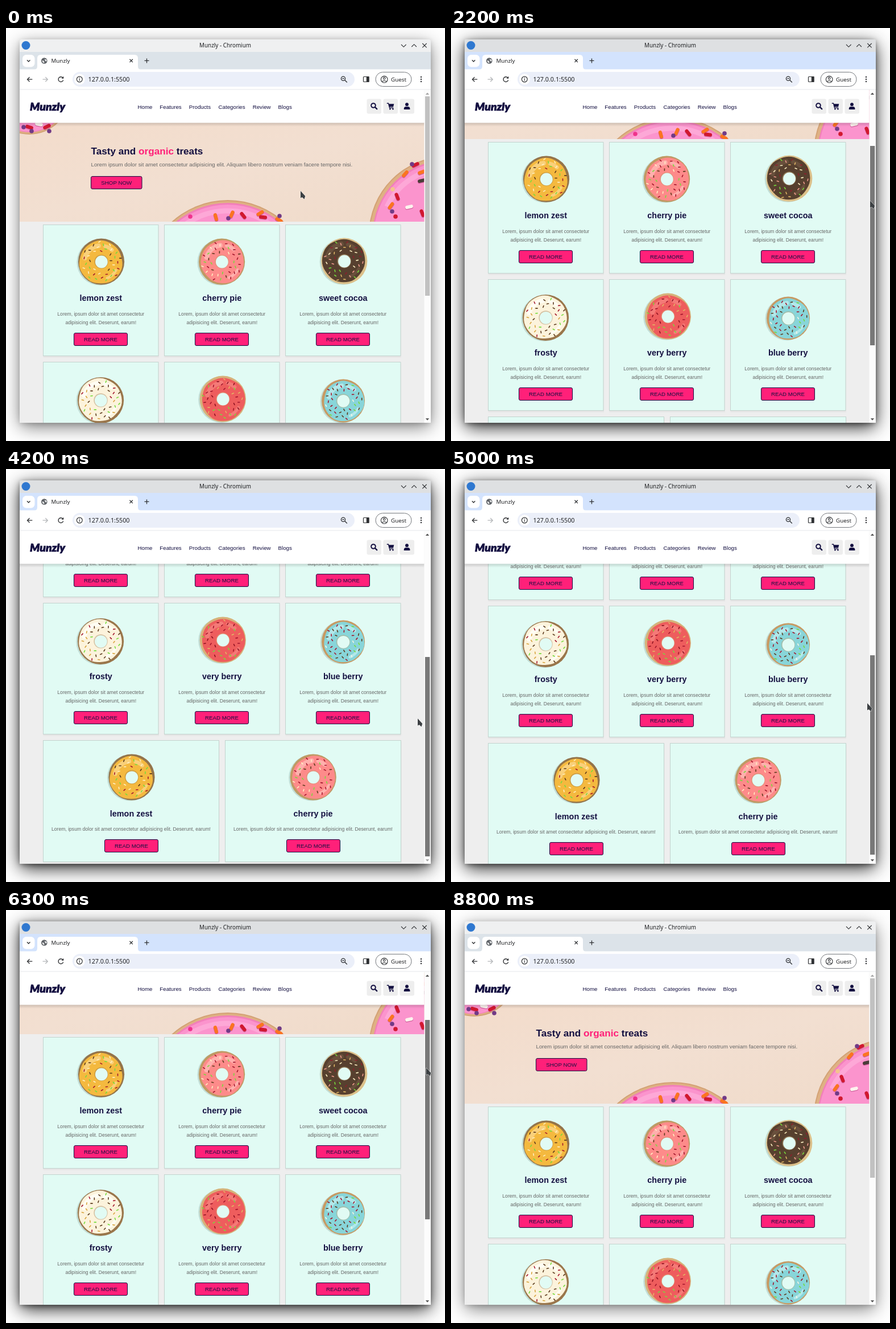
Recreate the animation shown at these times as an HTML page. Size 772 px wide and 725 px high, loop 8900 ms.

```html
<!DOCTYPE html>
<html lang="en">
<head>
<meta charset="utf-8">
<title>Munzly</title>
<style>
  html, body { margin: 0; width: 100%; height: 100%; overflow: hidden; background: #fff; }
  .shadow { position: absolute; left: 25px; top: 21px; width: 721px; height: 671px; border-radius: 4px; }
  #idle { box-shadow: 0 8px 32px rgba(0,0,0,.52), 0 2px 10px rgba(0,0,0,.2); }
  #focus { box-shadow: 0 8px 32px rgba(0,0,0,.88), 0 2px 10px rgba(0,0,0,.5); }
  svg { position: absolute; left: 0; top: 0; display: block; }
  text { font-family: "Liberation Sans", Arial, sans-serif; white-space: pre; }
  .ui { font-family: "Noto Sans", sans-serif; fill: #1f2023; }
  .logo { font: italic 900 19.5px Lato, sans-serif; fill: #130f40; stroke: #130f40; stroke-width: .7; }
</style>
</head>
<body>
<div class="shadow" id="idle"></div>
<div class="shadow" id="focus"></div>
<svg id="stage" width="772" height="725" viewBox="0 0 772 725"></svg>
<script>
const NAME = 'Munzly', NAVY = '#130f40', PINK = '#ff2079', MINT = '#e1fbf4', GREY = '#666';
const LOOP = 8900, STEP = 100, MAX_SCROLL = 351, TRACK = 1.671;

// Drawing helpers
const n = v => +v.toFixed(2);
const rect = (x, y, w, h, fill, r = 0, more = '') =>
  `<rect x="${x}" y="${y}" width="${w}" height="${h}" rx="${r}" fill="${fill}" ${more}/>`;
const circle = (x, y, r, fill, more = '') =>
  `<circle cx="${n(x)}" cy="${n(y)}" r="${n(r)}" fill="${fill}" ${more}/>`;
const path = (d, fill, more = '') => `<path d="${d}" fill="${fill}" ${more}/>`;
const line = (d, color, w = 1, more = '') =>
  path(d, 'none', `stroke="${color}" stroke-width="${w}" ${more}`);
const text = (x, y, size, str, fill, more = '') =>
  `<text x="${x}" y="${y}" font-size="${size}" fill="${fill}" ${more}>${str}</text>`;
const ui = (x, y, size, str, more = '') =>
  `<text class="ui" x="${x}" y="${y}" font-size="${size}" ${more}>${str}</text>`;
const MID = 'text-anchor="middle"', BOLD = 'font-weight="bold"', ROUND = 'stroke-linecap="round"';

function random(seed) {
  return () => (seed = (seed * 16807) % 2147483647) / 2147483647;
}

function arc(x, y, r, from, to) {
  const at = deg => {
    const a = deg * Math.PI / 180;
    return `${n(x + r * Math.cos(a))} ${n(y + r * Math.sin(a))}`;
  };
  return `M${at(from)}A${r} ${r} 0 0 1 ${at(to)}`;
}

function pill(x, y, angle, len, w, color) {
  const dx = Math.cos(angle) * len / 2, dy = Math.sin(angle) * len / 2;
  return line(`M${n(x - dx)} ${n(y - dy)}L${n(x + dx)} ${n(y + dy)}`, color, w, ROUND);
}

function button(x, y, w, label) {
  return rect(x, y, w, 22, PINK, 2.5, `stroke="${NAVY}"`) +
    text(x + w / 2, y + 14.6, 9.72, label, NAVY, MID);
}

// Doughnuts
const CRIMSON = '#a3152c', BROWN = '#5c3a1c', GREEN = '#76dc3c', CREAM = '#fff0c2', SAND = '#e2b765';
const FLAVOURS = {
  lemon:  { name: 'lemon zest',  dough: '#94744a', icing: '#f4b93f', shine: '#f9d07a', lean: 2.2,
            bits: [BROWN, CRIMSON, GREEN, CREAM, CRIMSON] },
  cherry: { name: 'cherry pie',  dough: '#bf9a64', icing: '#fd8b8a', shine: '#ffb0ad', lean: .1,
            bits: [BROWN, CRIMSON, GREEN, CREAM, CRIMSON] },
  cocoa:  { name: 'sweet cocoa', dough: '#dcc08a', icing: '#57402f', shine: '#69503c', lean: 3.9,
            bits: [SAND, '#8f1d2c', GREEN, CREAM, '#ef9a8c'] },
  frosty: { name: 'frosty',      dough: '#9a764b', icing: '#fcf3dc', shine: '#fffdf3', lean: 3.8,
            bits: [BROWN, CRIMSON, GREEN, '#d7a33c', BROWN] },
  berry:  { name: 'very berry',  dough: '#d6b27a', icing: '#ee5d5d', shine: '#f47a77', lean: .6,
            bits: [CRIMSON, SAND, GREEN, '#8c1020', SAND] },
  blue:   { name: 'blue berry',  dough: '#c79a63', icing: '#88d5d9', shine: '#b3e8ea', lean: .4,
            bits: [BROWN, CRIMSON, GREEN, '#f6f6e4', CRIMSON] }
};

function donut(x, y, r, f, seed) {
  const rnd = random(seed * 7919), count = 38;
  const cx = x + 1.3 * Math.cos(f.lean), cy = y + 1.3 * Math.sin(f.lean);
  const edge = Array.from({ length: 48 }, (_, i) => {
    const a = i * Math.PI / 24;
    const q = r * .93 + .5 * Math.sin(3 * a + seed) + .3 * Math.sin(7 * a);
    return `${n(cx + q * Math.cos(a))} ${n(cy + q * Math.sin(a))}`;
  });
  let s = circle(x - 2.5, y + 1, r, '#b9d3cb', 'opacity=".75"') + circle(x, y, r, f.dough) +
    path(`M${edge.join('L')}Z`, f.icing) +
    line(arc(cx, cy, r * .72, 195, 262), f.shine, r * .2, ROUND) +
    line(arc(cx, cy, r * .72, 285, 312), f.shine, r * .16, ROUND) +
    line(arc(cx, cy, r * .74, 28, 68), f.shine, r * .12, ROUND);
  for (let i = 0; i < count; i++) {
    const q = r * Math.sqrt(.17 + .6 * (i + .5) / count), a = i * 2.4 + seed;
    s += pill(x + q * Math.cos(a), y + q * Math.sin(a), rnd() * Math.PI, 3.2, 1.6,
      f.bits[Math.floor(rnd() * f.bits.length)]);
  }
  return s + circle(x, y, 12.2, f.dough, 'opacity=".4"') + circle(x + .3, y + .3, 10.9, MINT);
}

function card(x, y, w, key, dx, dy, wide) {
  const f = FLAVOURS[key], c = x + w / 2;
  const copy = ['Lorem, ipsum dolor sit amet consectetur', 'adipisicing elit. Deserunt, earum!'];
  const lines = wide ? [copy.join(' ')] : copy;
  return rect(x, y + 2, w + 1, wide ? 213 : 231, '#000', 0, 'opacity=".04"') +
    rect(x, y, w, wide ? 213 : 230, MINT, 0, 'stroke="#c3d3ce"') +
    donut(c + dx, y + dy, key === 'blue' ? 38 : 40.6, f, key.length + key.charCodeAt(0)) +
    text(c, y + 133.5, 14.4, f.name, NAVY, `${MID} ${BOLD}`) +
    lines.map((l, i) => text(c, y + (wide ? 158.3 : 159) + i * 15.5, 8.6, l, GREY, MID)).join('') +
    button(Math.floor(c - 47) + .5, wide ? y + 174 : y + 190, 94, 'READ MORE');
}

// Hero banner
const RED = '#d1182f', ORANGE = '#fb7420', PLUM = '#713a86', WHITE = '#fdf2ee';

function bigDonut(x, y, r, rim) {
  return circle(x, y, r, '#d3a275') + circle(x, y, r - 2, '#dfb184') + circle(x, y, r - rim, '#f27fba') +
    circle(x, y + 1, r - rim - 2, '#fb94cd') +
    line(arc(x, y, r - rim - 14, 205, 330), '#ffb6de', 9, 'opacity=".6"');
}

function hero() {
  const bits = [
    [369, 332, 1.3, ORANGE], [397, 327, 2, ORANGE], [417, 329, .9, RED], [447, 325, 2.6, ORANGE],
    [452, 332, .1, RED], [480, 337, .5, ORANGE], [720, 240, 2.7, RED], [702, 256, 2.3, ORANGE],
    [731, 253, 2.8, ORANGE], [731, 268, 2.9, '#4a3d38'], [688, 296, 1.2, RED], [677, 312, 2.2, ORANGE],
    [709, 314, 2.9, WHITE], [732, 325, 1.2, RED], [41, 174, .3, RED], [72, 173, 2.7, RED], [58, 169, .2, WHITE]
  ];
  const balls = [
    [324, 331, '#f0338c'], [391, 334, PLUM], [481, 330, PLUM], [714, 239, PLUM], [680, 283, '#f3c38e'],
    [679, 322, PLUM], [685, 331, RED], [31, 174, PLUM], [45, 181, PLUM], [76, 181, PLUM]
  ];
  return `<g clip-path="url(#banner)">` + rect(24, 166, 712, 174, 'url(#cream)') +
    bigDonut(41, 115, 72, 4) + bigDonut(390, 449, 147, 5) + bigDonut(776, 363, 138, 7) +
    bits.map(([x, y, a, c]) => pill(x, y + 1, a, 8, 6.5, '#d0609c') + pill(x, y, a, 8, 6, c)).join('') +
    balls.map(([x, y, c]) => circle(x, y, 3.8, c)).join('') + '</g>' +
    text(149.5, 221.8, 17.15, `Tasty and <tspan fill="${PINK}">organic</tspan> treats`, NAVY, BOLD) +
    text(149.5, 243, 9.726, 'Lorem ipsum dolor sit amet consectetur adipisicing elit. ' +
      'Aliquam libero nostrum veniam facere tempore nisi.', GREY) +
    button(149.5, 260.5, 89.5, 'SHOP NOW');
}

function page() {
  const xs = [65.5, 278.5, 491.5];
  const rows = [
    [['lemon', .8, 64.7], ['cherry', -.2, 64.7], ['cocoa', 2, 63.7]],
    [['frosty', -.2, 67], ['berry', 1.6, 64.7], ['blue', .3, 68]]
  ];
  return hero() +
    rows.map((row, r) => row.map(([k, dx, dy], i) =>
      card(xs[i], 345.5 + r * 241, 202.5, k, dx, dy)).join('')).join('') +
    card(65.5, 827.5, 309, 'lemon', 1, 64.5, true) + card(385.5, 827.5, 309, 'cherry', .2, 64.5, true);
}

// Fixed site header
function header() {
  const nav = [[231.5, 'Home'], [270.3, 'Features'], [321.8, 'Products'],
    [373.6, 'Categories'], [433.7, 'Review'], [478.5, 'Blogs']];
  return rect(24, 166, 711.5, 7, 'url(#fade)') + rect(24, 108, 711.5, 58.5, '#fff') +
    `<text class="logo" x="42" y="145">${NAME}</text>` +
    nav.map(([x, s]) => text(x, 141.6, 9.72, s, NAVY)).join('') +
    [634.5, 663.5, 692.5].map(x => rect(x, 124.5, 25.5, 26, '#eee', 3)).join('') +
    circle(646, 136, 3.8, 'none', `stroke="${NAVY}" stroke-width="2"`) +
    line('M649 139l3.2 3.2', NAVY, 2.4, ROUND) +
    line('M670.3 132.3h2.2l2 7.8h6.4', NAVY, 1.4, ROUND) +
    path('M673 133.2h9.3l-1.3 5.4h-6.8z', NAVY) +
    circle(675.4, 142.2, 1.3, NAVY) + circle(680.4, 142.2, 1.3, NAVY) +
    circle(705, 134.2, 2.9, NAVY) + path('M699.8 143v-1.4q0-3.6 3.6-3.6h3.4q3.6 0 3.6 3.6V143z', NAVY);
}

// Browser frame
function frame() {
  const ink = '#303235', bar = 'M24 42V23q0-3 3-3H744q3 0 3 3V42z';
  const cross = (x, y, r) => `M${x - r} ${y - r}l${2 * r} ${2 * r}M${x + r} ${y - r}l${-2 * r} ${2 * r}`;
  return path(bar, '#eff0f1') + rect(24, 42, 723, 31, '#dce3e9') +
    '<g id="tint">' + path(bar, '#dee0e2') + rect(24, 42, 723, 31, '#d3e3fd') + '</g>' +
    circle(35, 30.5, 7.5, '#2f78d0') +
    ui(385.5, 34.3, 9.9, `${NAME} - Chromium`, MID) +
    line(`M695 29l4.3 4.3 4.3-4.3M713.3 33l4.3-4.3 4.3 4.3${cross(736, 30.7, 3.7)}`, ink, 1.1) +
    path('M49 73q6 0 6-6V53q0-6 6-6H226q6 0 6 6V67q0 6 6 6z', '#fff') +
    rect(29, 47, 21.5, 21.5, '#fff', 6.5) + line('M37 56.2l2.7 2.7 2.7-2.7', ink, 1.4) +
    circle(67.3, 57.5, 5.3, '#5f6368') +
    path('M63.5 57q2.5-.5 3.5 1.5t0 3q-3-.5-3.5-4.5zM67 53.5q1 2 3 1.5t1.5 3.5q-3 0-3-2z', '#fff', 'opacity=".85"') +
    ui(79.5, 61, 9.75, NAME) +
    line(cross(220.2, 57.4, 2.7), ink, 1.3) + line('M243.5 57.4h8M247.5 53.4v8', ink, 1.3) +
    rect(24, 72.5, 723, 36, '#fff') + rect(24, 107.5, 723, .8, '#dfe1e5') +
    line('M46.3 90.2h-8.8m4-4l-4 4 4 4', ink, 1.3) + line('M64.5 90.2h8.8m-4-4l4 4-4 4', '#b4b6b9', 1.3) +
    line('M99.8 87.2A4.4 4.4 0 1 0 100.7 91.4', ink, 1.4) + path('M101.3 84.8v4h-4z', ink) +
    rect(117, 77, 496, 26, '#ebeff9', 13) + circle(129.3, 90, 9.5, '#fff') +
    circle(129.3, 90, 4.9, 'none', `stroke="${ink}" stroke-width="1.2"`) +
    line('M129.3 89.3v3.2M129.3 87v1.2', ink, 1.2) +
    ui(144.5, 93.9, 10.75, '127.0.0.1:5500') +
    circle(593, 88.7, 3.6, 'none', `stroke="${ink}" stroke-width="1.3"`) +
    line('M595.8 91.5l4 4M591.2 88.7h3.6', ink, 1.3) +
    rect(628.5, 85.5, 9.5, 9, 'none', 1, `stroke="${ink}" stroke-width="1.2"`) + rect(633.8, 85, 4.7, 10, ink) +
    rect(650, 77.5, 63, 25, '#fff', 12.5, 'stroke="#74777c"') +
    circle(665.2, 90.2, 5.8, 'none', `stroke="${ink}" stroke-width="1.1"`) +
    circle(665.2, 88.4, 1.8, 'none', `stroke="${ink}" stroke-width="1.1"`) +
    line('M661.2 94.2q4-3.4 8 0', ink, 1.1) + ui(677, 93.8, 9.8, 'Guest') +
    [86, 90, 94].map(y => circle(730, y, 1.2, ink)).join('');
}

const stage = document.getElementById('stage');
stage.innerHTML = `
  <defs>
    <clipPath id="view"><rect x="24" y="108" width="711.5" height="585"/></clipPath>
    <clipPath id="banner"><rect x="24" y="166" width="712" height="174"/></clipPath>
    <linearGradient id="cream" x2="1" y2="1">
      <stop stop-color="#f3dccb"/><stop offset=".5" stop-color="#f2dfd1"/><stop offset="1" stop-color="#f0dbca"/>
    </linearGradient>
    <linearGradient id="fade" x2="0" y2="1">
      <stop stop-opacity=".16"/><stop offset="1" stop-opacity="0"/>
    </linearGradient>
  </defs>` +
  rect(24, 42, 723, 651, '#eee') +
  `<g clip-path="url(#view)"><g id="page">${page()}</g></g>` +
  header() + rect(735.5, 108, 11.5, 585, '#fcfcfc') +
  path('M737.8 117h6.4l-3.2-3.6z', '#505050', 'id="up"') +
  path('M737.8 685.2h6.4l-3.2 3.6z', '#505050', 'id="down"') +
  rect(737, 120, 8.3, 350, '#c1c1c1', 0, 'id="thumb"') + frame() +
  path('M0 0V12.6L2.7 11 6.6 14.6 8.2 9z', '#3c4043', 'id="cursor" stroke="#fff" stroke-width=".9" paint-order="stroke"');

// Motion: [time, value...]
const SCROLL = [[1400, 0], [1500, 2], [1700, 18], [1900, 62], [2200, 145], [2400, 185], [2700, 185],
  [2900, 233], [3200, 325], [3600, 351], [4600, 351], [5000, 346], [5300, 312], [5800, 222],
  [6300, 122], [6800, 21], [7100, 4], [7400, 0]];
const POINTER = [[100, 518, 286], [400, 476, 322], [700, 590, 290], [1000, 726, 230], [1300, 740, 207],
  [1500, 740, 208], [1800, 739, 232], [2200, 737, 303], [2400, 736, 316], [2700, 736, 316],
  [3000, 729, 370], [3200, 725, 401], [3600, 723, 427], [3800, 723, 441], [4100, 723, 441],
  [5000, 732, 411], [5800, 743, 334], [6000, 745, 313], [6800, 728, 216], [7400, 723, 176],
  [7900, 723, 176], [8000, 429, 71]];
const FOCUS = [[1400, 0], [1600, 1], [8600, 1], [8800, 0]];

function sample(keys, t) {
  const i = keys.findIndex(k => k[0] >= t);
  if (i === 0) return keys[0].slice(1);
  if (i < 0) return keys[keys.length - 1].slice(1);
  const a = keys[i - 1], b = keys[i], p = (t - a[0]) / (b[0] - a[0]);
  return a.slice(1).map((v, j) => v + (b[j + 1] - v) * p);
}

const parts = {};
for (const id of ['page', 'thumb', 'up', 'down', 'cursor', 'tint', 'focus', 'idle'])
  parts[id] = document.getElementById(id);

function draw(time) {
  const t = Math.floor(time % LOOP / STEP) * STEP;
  const scroll = Math.round(sample(SCROLL, t)[0]);
  const [x, y] = sample(POINTER, t).map(Math.round);
  const [focus] = sample(FOCUS, t);
  parts.page.setAttribute('transform', `translate(0 ${-scroll})`);
  parts.thumb.setAttribute('y', Math.round(120 + scroll / TRACK));
  parts.thumb.setAttribute('fill',
    t >= 1500 && t < 7700 ? '#787878' : t >= 1300 && t < 1500 ? '#a8a8a8' : '#c1c1c1');
  parts.up.setAttribute('fill', scroll > 0 ? '#505050' : '#a3a3a3');
  parts.down.setAttribute('fill', scroll < MAX_SCROLL ? '#505050' : '#a3a3a3');
  parts.cursor.setAttribute('transform', `translate(${x} ${y})`);
  parts.cursor.setAttribute('visibility', t < 8100 ? 'visible' : 'hidden');
  parts.tint.setAttribute('opacity', focus);
  parts.focus.style.opacity = focus;
  parts.idle.style.opacity = 1 - focus;
}

const start = performance.now();
function tick() {
  draw(performance.now() - start);
  requestAnimationFrame(tick);
}
tick();
</script>
</body>
</html>
```
